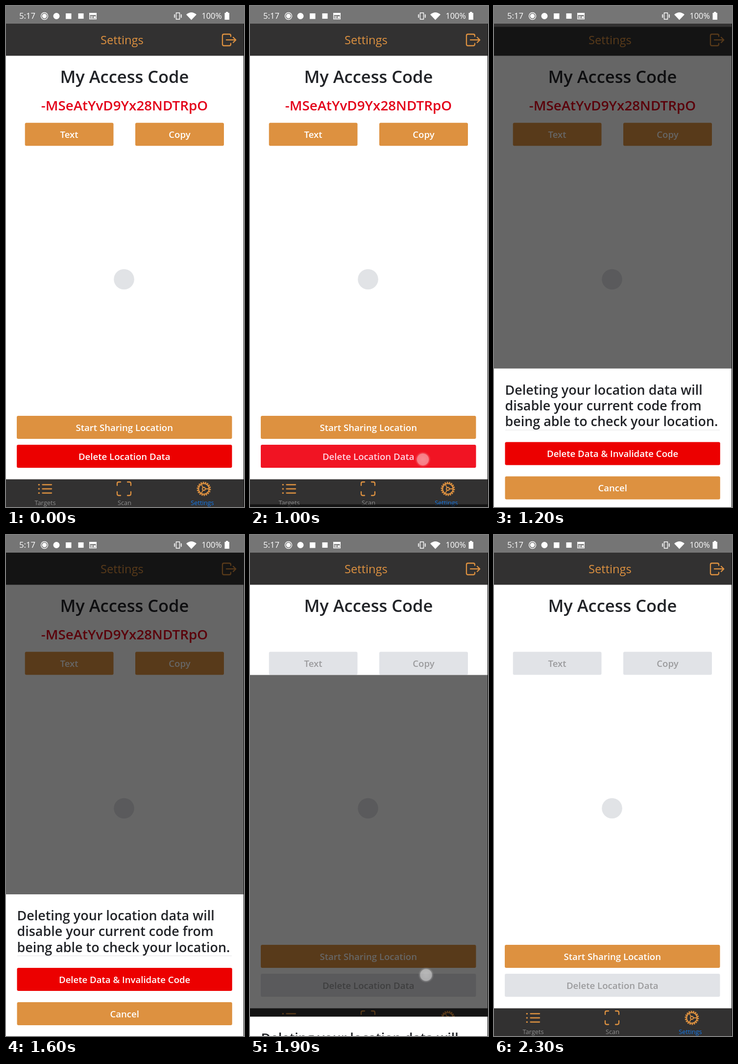
Animation, 486 px wide and 1022 px high, one loop 3.2 s. Source, as an HTML page:

```html
<!DOCTYPE html>
<html lang="en">
<head>
<meta charset="utf-8">
<title>Access code settings</title>
<style>
html, body { margin: 0; width: 100%; height: 100%; overflow: hidden; background: #fff; }
svg { display: block; width: 100%; height: 100%; }
text { font-family: "Open Sans", "Noto Sans", sans-serif; }
.bold { font-weight: 600; }
.mid { text-anchor: middle; }
.line { fill: none; stroke: #dd9140; stroke-width: 2.3; stroke-linecap: round; stroke-linejoin: round; }
.dots { stroke-width: 3; }
.fine { stroke-width: 1.8; }
.thin { fill: none; stroke: #fff; stroke-width: 1.4; }
</style>
</head>
<body>
<svg viewBox="0 0 486 1022" preserveAspectRatio="none">
  <defs>
    <radialGradient id="glow">
      <stop offset="0" stop-color="#fff"/>
      <stop offset=".72" stop-color="#fff" stop-opacity=".9"/>
      <stop offset=".8" stop-color="#fff" stop-opacity=".35"/>
      <stop offset="1" stop-color="#fff" stop-opacity="0"/>
    </radialGradient>
  </defs>
  <rect width="486" height="1022" fill="#fff"/>

  <!-- Header -->
  <rect y="36" width="486" height="65.5" fill="#323131"/>
  <text class="mid" x="237" y="78" font-size="23.7" fill="#dd9140">Settings</text>
  <path class="line" d="M459 62V60.500Q459 57.500 456 57.500H445Q442 57.500 442 60.500V78Q442 81 445 81H456Q459 81 459 78V76.500M450 69.200H469M464 64L469.300 69.200L464 74.500"/>

  <!-- Page -->
  <text class="mid bold" x="242" y="157" font-size="34.5" fill="#222428">My Access Code</text>
  <text id="code" class="mid bold" x="242" y="213" font-size="27.8" fill="#e30019">-MSeAtYvD9Yx28NDTRpO</text>
  <circle cx="241" cy="557.5" r="20.8" fill="#e1e3e6"/>
  <g id="buttons"></g>

  <!-- Tabs -->
  <rect y="965.5" width="486" height="57" fill="#323131"/>
  <path class="line" d="M74.500 976.500H93M74.500 985H93M74.500 993.500H93"/>
  <path class="line dots" d="M67 976.500h.6M67 985h.6M67 993.500h.6"/>
  <path class="line" d="M227 978V974Q227 971 230 971H234M248 971H252Q255 971 255 974V978M255 991V995Q255 998.500 252 998.500H248M234 998.500H230Q227 998.500 227 995V991"/>
  <g transform="translate(404 985)">
    <circle r="10.8" class="line"/>
    <circle r="13" fill="none" stroke="#dd9140" stroke-width="2.8" pathLength="36" stroke-dasharray="1.2 .8"/>
    <circle r="3" class="line fine"/>
    <path class="line fine" d="M3 0H10.500M-1.500 -2.600L-5.300 -9.100M-1.500 2.600L-5.300 9.100"/>
  </g>
  <g class="mid" font-size="12.8">
    <text x="80" y="1018" fill="#8e8e8e">Targets</text>
    <text x="242" y="1018" fill="#8e8e8e">Scan</text>
    <text x="401" y="1018" fill="#1478e8">Settings</text>
  </g>

  <!-- Backdrop and sheet slide together -->
  <g id="modal">
    <rect y="36" width="486" height="1000" fill="#000" opacity=".6"/>
    <rect y="733" width="486" height="300" fill="#fff"/>
    <g class="bold" font-size="26.9" fill="#222428">
      <text x="22.500" y="786">Deleting your location data will</text>
      <text x="22.500" y="818.300">disable your current code from</text>
      <text x="22.500" y="850.600">being able to check your location.</text>
    </g>
    <rect x="23" y="858" width="438" height="1" fill="#e4e4e6"/>
    <g id="choices"></g>
  </g>
  <rect id="press" x="22" y="895" width="439.500" height="47" rx="3" fill="#ff4f8c" opacity=".25"/>
  <circle id="touch" r="16" fill="url(#glow)"/>

  <!-- Status bar -->
  <rect width="486" height="36" fill="#757575"/>
  <text x="27" y="26" font-size="16.7" fill="#fff">5:17</text>
  <text x="399.500" y="26" font-size="16.3" fill="#fff">100%</text>
  <circle class="thin" cx="78.500" cy="20.500" r="7"/>
  <g fill="#fff">
    <circle cx="78.500" cy="20.500" r="4.700"/>
    <circle cx="103" cy="20.500" r="6.500"/>
    <rect x="122" y="15" width="11.500" height="11.500"/>
    <rect x="147.500" y="15" width="11" height="11"/>
    <path d="M170 14h15v4.500h-15zM179 21h4v4h-4z"/>
    <path d="M368 17.500Q378.500 8.500 389 17.500L378.500 28.500Z"/>
    <path d="M446.500 14H449V12H453.500V14H456V28H446.500Z"/>
  </g>
  <path class="thin" d="M170.700 15V26.500H184.300V15M172.500 21.500H177.500M172.500 24H177.500M347.500 14H354.500V27H347.500ZM345 17L343.500 19L345 20.500L343.500 22L345 24M357 17L358.500 19L357 20.500L358.500 22L357 24"/>
  <rect x="485" y="36" width="1" height="986" fill="#111"/>
</svg>
<script>
const LOOP = 3200, STEP = 100;
const SLIDE = 222, TRAVEL = 986, OPEN_AT = 989.5, CLOSE_AT = 1825.5;
const PRESS_AT = 1000, RELEASE_AT = 1200, CLEARED_AT = 1900;
const ORANGE = '#dd9140', RED = '#ec0000', GREY = '#e1e3e7';
const $ = id => document.getElementById(id);
const show = (id, on) => { $(id).style.display = on ? '' : 'none'; };

function add(parent, tag, attrs, label = '') {
  const el = document.createElementNS('http://www.w3.org/2000/svg', tag);
  for (const key in attrs) el.setAttribute(key, attrs[key]);
  el.textContent = label;
  parent.append(el);
  return el;
}

function button(parent, x, y, width, color, label) {
  const box = add(parent, 'rect', { x, y, width, height: 47, rx: 3 });
  const text = add(parent, 'text', {
    class: 'mid bold', x: x + width / 2, y: y + 30.7, 'font-size': 18.6
  }, label);
  const enable = on => {
    box.setAttribute('fill', on ? color : GREY);
    text.setAttribute('fill', on ? '#fff' : '#9b9b9d');
  };
  enable(true);
  return enable;
}

const buttons = $('buttons'), choices = $('choices');
button(buttons, 22, 836, 439.5, ORANGE, 'Start Sharing Location');
const dataButtons = [
  button(buttons, 38.7, 238.3, 180.8, ORANGE, 'Text'),
  button(buttons, 264, 238.3, 181, ORANGE, 'Copy'),
  button(buttons, 22, 895, 439.5, RED, 'Delete Location Data')
];
button(choices, 22.5, 883, 439.3, RED, 'Delete Data & Invalidate Code');
button(choices, 22.5, 953, 439.3, ORANGE, 'Cancel');

function ease(t, start) {
  const p = Math.min(1, Math.max(0, (t - start) / SLIDE));
  return (1 - Math.cos(Math.PI * p)) / 2;
}

// Each tap: start, end, position, opacity while held and in its last step
const taps = [
  { from: 900, to: 1200, x: 353, y: 925, held: .5, last: .14 },
  { from: 1700, to: 2000, x: 359.5, y: 897.5, held: .55, last: .55 }
];

function draw(t) {
  const shown = ease(t, OPEN_AT) - ease(t, CLOSE_AT);
  $('modal').setAttribute('transform', `translate(0 ${TRAVEL * (1 - shown)})`);
  show('modal', shown > 0);

  const active = t < CLEARED_AT;
  show('code', active);
  dataButtons.forEach(enable => enable(active));
  show('press', t >= PRESS_AT && t < RELEASE_AT);

  const tap = taps.find(p => t >= p.from && t < p.to);
  show('touch', tap);
  if (tap) {
    $('touch').setAttribute('cx', tap.x);
    $('touch').setAttribute('cy', tap.y);
    $('touch').setAttribute('opacity', t < tap.to - STEP ? tap.held : tap.last);
  }
}

let origin = null;
function frame(now) {
  origin ??= now;
  const t = (now - origin) % LOOP;
  draw(Math.floor(t / STEP) * STEP);
  requestAnimationFrame(frame);
}
draw(0);
requestAnimationFrame(frame);
</script>
</body>
</html>
```
